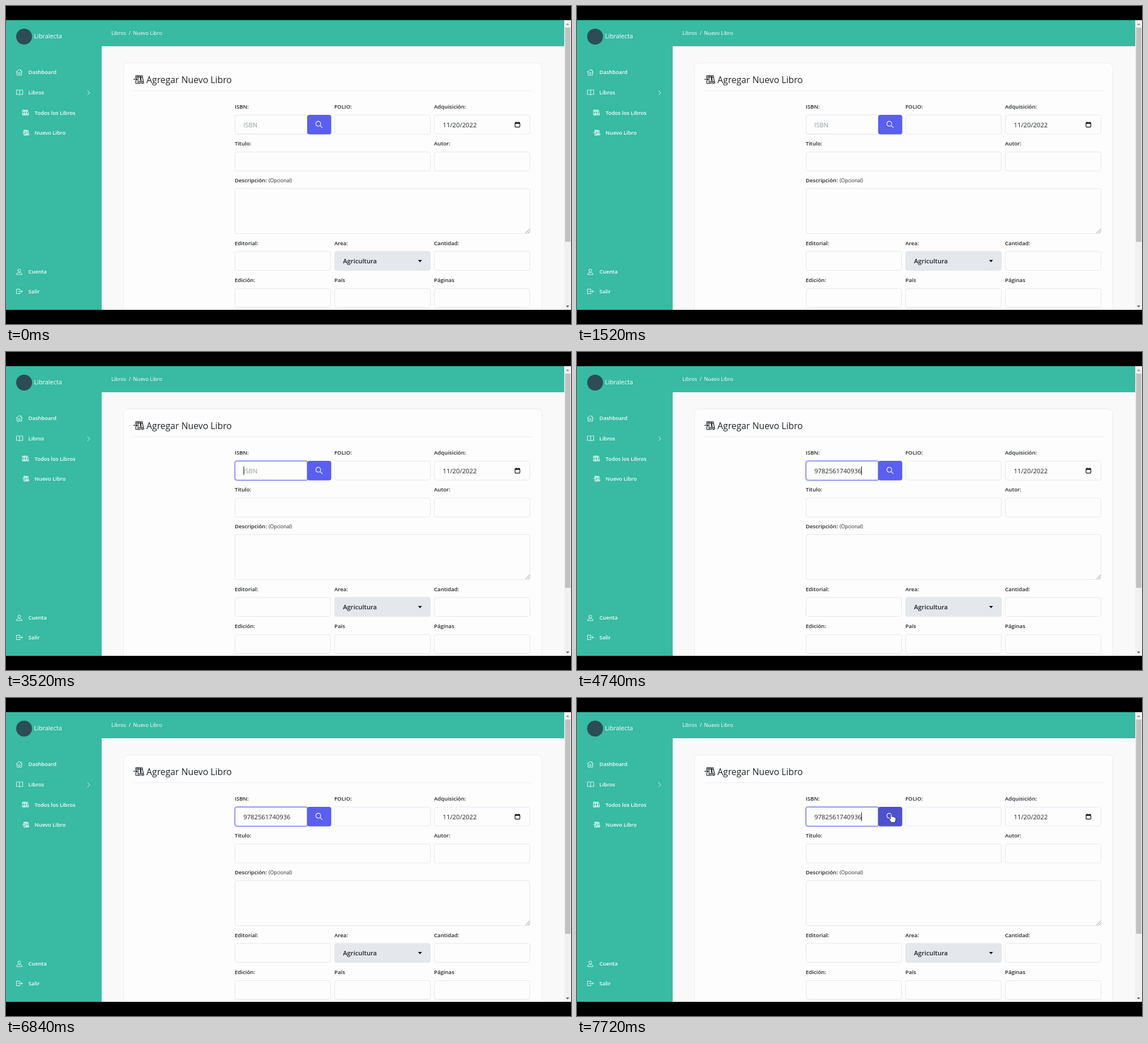
Recreate the animation shown at these times as an HTML page with a canvas. Size 998x561 px, loop 8000 ms.

```html
<!DOCTYPE html>
<html lang="es">
<head>
<meta charset="utf-8">
<title>Nuevo Libro</title>
<style>
  html, body { margin: 0; width: 100%; height: 100%; overflow: hidden; background: #000; }
  canvas { display: block; width: 998px; height: 561px; }
</style>
</head>
<body>
<canvas id="stage"></canvas>
<script>
const W = 998, H = 561, LOOP = 8000;
const FONT = '"Open Sans", "Noto Sans", sans-serif';
const TEAL = '#38baa3', INK = '#212529', EDGE = '#e4e7ee', FIELD = '#fdfdfd';
const ISBN = '9782561740936';
const cv = document.getElementById('stage');
const c = cv.getContext('2d');
const dpr = window.devicePixelRatio || 1;
cv.width = W * dpr;
cv.height = H * dpr;

const clamp = v => Math.max(0, Math.min(1, v));
const part = (t, from, to) => clamp((t - from) / (to - from));
const ease = p => p * p * (3 - 2 * p);
const mix = (a, b, p) => a + (b - a) * p;
const rgb = (a, b, p) => `rgb(${a.map((v, i) => Math.round(mix(v, b[i], p)))})`;

function rect(x, y, w, h, fill) {
  c.fillStyle = fill;
  c.fillRect(x, y, w, h);
}

function box(x, y, w, h, r, fill, edge, line = 1) {
  c.beginPath();
  c.roundRect(x, y, w, h, r);
  if (fill) { c.fillStyle = fill; c.fill(); }
  if (edge) { c.strokeStyle = edge; c.lineWidth = line; c.stroke(); }
}

function text(s, x, y, size, weight = 400, color = INK) {
  c.font = `${weight} ${size}px ${FONT}`;
  c.fillStyle = color;
  c.fillText(s, x, y);
}

// Strokes an SVG path string in a local coordinate system.
function icon(d, x, y, color, line = 1, scale = 1) {
  c.save();
  c.translate(x, y);
  c.scale(scale, scale);
  c.strokeStyle = color;
  c.lineWidth = line / scale;
  c.lineCap = c.lineJoin = 'round';
  c.stroke(new Path2D(d));
  c.restore();
}

function pointer(d, x, y) {
  const p = new Path2D(d);
  c.save();
  c.translate(x, y);
  c.lineJoin = 'round';
  c.fillStyle = '#fff';
  c.fill(p);
  c.strokeStyle = '#2c2c38';
  c.lineWidth = 0.9;
  c.stroke(p);
  c.restore();
}

function tri(x, y, w, h, color) {
  c.fillStyle = color;
  c.beginPath();
  c.moveTo(x - w / 2, y);
  c.lineTo(x + w / 2, y);
  c.lineTo(x, y + h);
  c.fill();
}

const ICON = {
  house: 'M0 5 L5.5 .5 L11 5 M1.5 4 V10.5 H9.5 V4 M8.5 1 V2.8 M4 7 A1.5 1.5 0 1 1 7 7 A1.5 1.5 0 1 1 4 7',
  book: 'M6 1.5 C4.5 0 2 .2 .5 .8 V8.8 C2 8.2 4.5 8.2 6 9.3 C7.5 8.2 10 8.2 11.5 8.8 V.8 C10 .2 7.5 0 6 1.5 V9.3',
  books: 'M.5 .5 H3.5 V9.5 H.5 Z M3.5 .5 H6.5 V9.5 H3.5 Z M.5 2.5 H6.5 M.5 7.5 H6.5 M6.7 1.2 L9 .5 L11 9 L8.7 9.6 Z M7.1 3 L9.4 2.4 M8.3 7.8 L10.6 7.2',
  add: 'M2.5 3.2 V.5 H5 V9.5 H2.5 V6.5 M5 .5 H7.5 V9.5 H5 M2.5 2.2 H7.5 M5 7.6 H7.5 M7.7 1.2 L9.7 .6 L11.5 9 L9.4 9.6 Z M8 2.8 L10 2.3 M9 7.8 L11.1 7.2 M0 4.8 H4 M2.4 3.2 L4 4.8 L2.4 6.4',
  person: 'M3 3 A2.5 2.5 0 1 1 8 3 A2.5 2.5 0 1 1 3 3 M.7 10 C.7 7.4 2.5 6.8 5.5 6.8 C8.5 6.8 10.3 7.4 10.3 10 Z',
  exit: 'M6.5 3 V1 H.5 V9 H6.5 V7 M3.5 5 H11 M8.8 2.8 L11 5 L8.8 7.2'
};
const ARROW = 'M0 0 V11.3 L2.6 8.9 L4.4 12.8 L6.2 12 L4.5 8.2 H8 Z';
const HAND = 'M-1.2 1 Q0 -1 1.2 1 V5 Q2.6 4 3.5 5.3 Q5 4.6 5.8 6 Q7.6 5.5 8 7.3 V10.5 L6.6 15 H.2 L-3.6 9.4 Q-3.6 7.6 -2.2 8.3 L-1.2 9.3 Z';

function chrome() {
  rect(0, 0, W, H, '#000');
  rect(0, 25, W, 511, '#f9f9fa');
  rect(0, 25, 986, 46, TEAL);
  rect(0, 25, 169, 511, TEAL);

  rect(986, 25, 12, 511, '#f1f1f1');
  rect(987.5, 38, 9.5, 378, '#c1c1c1');
  tri(992, 33.5, 6, -3, '#8c8c8c');
  tri(992, 528.5, 6, 3, '#505050');

  c.fillStyle = '#2c4d55';
  c.beginPath();
  c.arc(32, 54, 14, 0, 7);
  c.fill();
  text('Libralecta', 49.5, 57.3, 10.9, 400, '#fff');

  text('Libros', 186, 51.4, 9.2, 500, '#fff');
  text('/', 217, 51.4, 9.2, 500, '#fff');
  text('Nuevo Libro', 224.5, 51.4, 9.1, 500, '#fff');

  const menu = [
    ['Dashboard', 40, 117, ICON.house],
    ['Libros', 40, 153, ICON.book],
    ['Todos los Libros', 51, 188.5, ICON.books],
    ['Nuevo Libro', 51, 224, ICON.add],
    ['Cuenta', 40, 469, ICON.person],
    ['Salir', 40, 504, ICON.exit]
  ];
  for (const [s, x, y, d] of menu) {
    icon(d, x - 22, y - 5.5, '#f4fffd', 0.9);
    text(s, x - 0.4, y + 3.4, 9.4, 600, '#f4fffd');
  }
  icon('M0 0 L4 4 L0 8', 144, 149, '#e6fbf6', 0.9);
}

function form() {
  box(207.5, 100.5, 739, 460, 8, '#fdfdfd', '#eaecf3');
  icon(ICON.add, 225.5, 122, INK, 1.2, 1.55);
  text('Agregar Nuevo Libro', 248, 136, 15.8, 500);
  rect(225, 149, 705, 1, '#eceef2');

  const labels = [
    ['ISBN:', 404, 181], ['FOLIO:', 580, 181], ['Adquisición:', 756, 181],
    ['Titulo:', 404, 246.4], ['Autor:', 756, 246.4], ['Descripción:', 404, 311],
    ['Editorial:', 404, 421.7], ['Area:', 580, 421.7], ['Cantidad:', 756, 421.7],
    ['Edición:', 404, 487], ['País', 580, 487], ['Páginas', 756, 487]
  ];
  for (const [s, x, y] of labels) text(s, x, y, 9.6, 600);
  text('(Opcional)', 464, 311, 8.7, 500);

  const field = (x, y, w, h = 33.5) => box(x + 0.5, y + 0.5, w - 1, h, 4, FIELD, EDGE);
  field(404, 192, 132);
  field(580, 192, 170);
  field(756, 192, 170);
  field(404, 257, 346);
  field(756, 257, 170);
  field(404, 321.5, 522, 79.5);
  for (const x of [404, 580, 756]) {
    field(x, 432.5, 170);
    field(x, 498, 170, 33);
  }
  box(580, 432.5, 170, 34.5, 4, '#e4e8ec');
  text('Agricultura', 595.2, 454, 11.2, 600);
  tri(731.3, 448, 7, 4, '#111');
  icon('M0 7 L7 0 M4 7 L7 4', 918, 393.5, '#77797d', 0.9);

  text('11/20/2022', 771.5, 213.7, 11.3);
  box(899.2, 206, 8.4, 7.6, 1, null, '#111', 1.2);
  rect(898.8, 205.3, 9.2, 2.5, '#111');
  rect(900.5, 204.2, 1.2, 1.5, '#111');
  rect(905.2, 204.2, 1.2, 1.5, '#111');
}

function search(t) {
  const focus = ease(part(t, 3160, 3320));
  const hover = ease(part(t, 7280, 7430));
  const filled = t >= 4740;

  if (focus) {
    box(402.5, 190.5, 131, 37.5, 5, `rgba(92,96,240,${0.25 * focus})`);
  }
  box(404.5, 192.5, 127.5, 33.5, [4, 0, 0, 4], FIELD, rgb([228, 231, 238], [96, 100, 238], focus));
  box(532, 192, 42.5, 34.5, 4, rgb([90, 95, 239], [77, 81, 205], hover));
  icon('M0 4.3 A4.3 4.3 0 1 1 8.6 4.3 A4.3 4.3 0 1 1 0 4.3 M7.5 7.5 L11.3 11.3', 547.3, 203.4, '#fff', 1.1);

  if (filled) text(ISBN, 419.3, 213.7, 11.2);
  else text('ISBN', 419.3, 213.7, 11.2, 400, '#939b9f');

  const blank = (t >= 4600 && t < 4740) || (t >= 6330 && t < 6880);
  if (t >= 3200 && !blank) rect(filled ? 502 : 419.5, 202, 1.1, 15, INK);
}

function mouse(t) {
  if (t >= 260 && t < 1240) {
    const a = ease(part(t, 200, 580)), b = ease(part(t, 760, 1260));
    const x = mix(mix(618, 568, a), 488, b);
    const y = mix(mix(62, 119, a), 194, b);
    if (y < 191) pointer(ARROW, x, y);
  } else if (t >= 7270) {
    const p = 1 - (1 - part(t, 7260, 7700)) ** 2;
    pointer(HAND, mix(536, 555, p), mix(209, 204.5, p));
  }
}

function draw(t) {
  c.setTransform(dpr, 0, 0, dpr, 0, 0);
  chrome();
  c.save();
  c.beginPath();
  c.rect(169, 71, 817, 465);
  c.clip();
  form();
  search(t);
  mouse(t);
  c.restore();
}

const start = performance.now();
function frame() {
  draw((performance.now() - start) % LOOP);
  requestAnimationFrame(frame);
}
frame();
</script>
</body>
</html>
```
